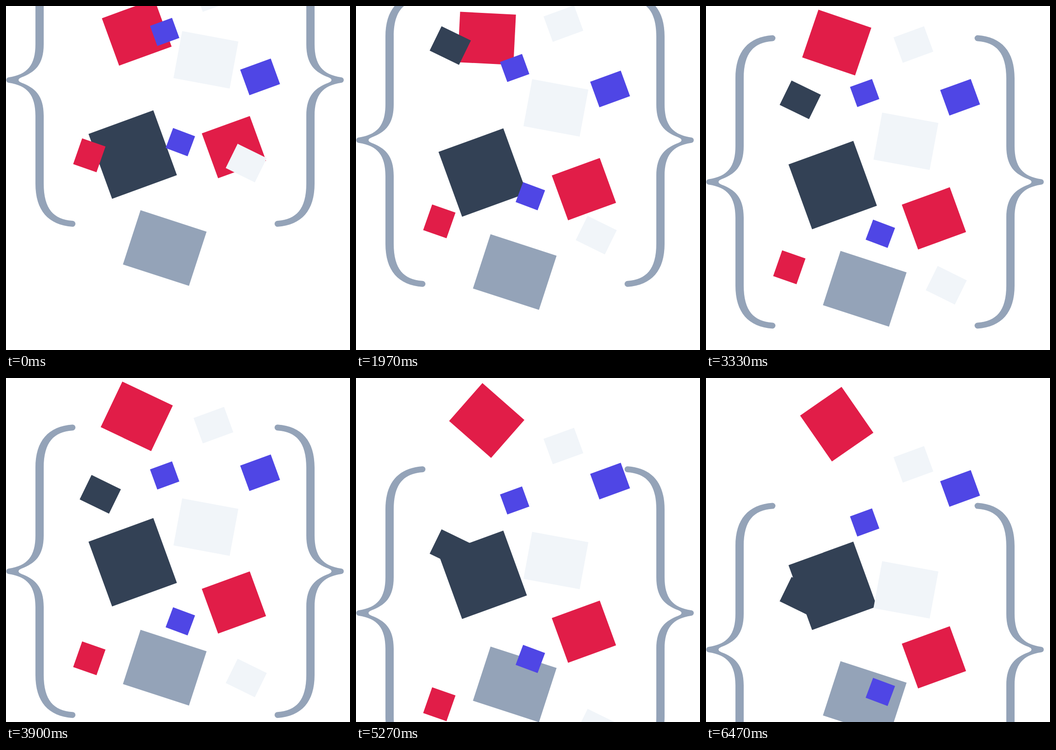
An HTML page for the animation above (6.51 s loop, 748 px wide and 748 px high).

```html
<!DOCTYPE html>
<html lang="en">
<head>
<meta charset="utf-8">
<title>Parallax braces</title>
<style>
html, body { margin: 0; width: 100%; height: 100%; overflow: hidden; background: #fff; }
svg { display: block; width: 100%; height: 100%; }
</style>
</head>
<body>
<svg viewBox="0 0 748 748">
  <g id="tiles"></g>
  <g id="braces" fill="#94a3b8">
    <path id="brace" d="M144.5-319 C92-315 64-284 64-225 V-78 C64-32 46-12 6.5-6 A6 6 0 0 0 6.5 6
      C46 12 64 32 64 78 V225 C64 284 92 315 144.5 319 A6.5 6.5 0 0 0 144.5 306
      C104 303 82 281 82 225 V78 C82 32 62 17 34 6 C25 2.5 25-2.5 34-6
      C62-17 82-32 82-78 V-225 C82-281 104-303 144.5-306 A6.5 6.5 0 0 0 144.5-319Z"/>
    <use href="#brace" transform="translate(735) scale(-1 1)"/>
  </g>
</svg>
<script>
const LOOP = 6510, LAST_STEP = 194, SCROLL_PER_STEP = 2.214, SPIN = 0.1753;
const red = '#e11d48', blue = '#4f46e5', grey = '#94a3b8', dark = '#334155', light = '#f1f5f9';

// Back to front: colour, centre x, starting centre y, width, height, angle, scroll speed
const tiles = [
  [red, 284.3, 57.4, 121.5, 109.7, -20, 0.1],
  [blue, 552.5, 154.2, 70.8, 59, -20, 0.2],
  [dark, 275.5, 323, 150, 150, -20, 0.3],
  [grey, 345.2, 526.3, 151, 124, 18, 0.4],
  [light, 451, -27, 70.6, 58.8, -20, 0.5],
  [blue, 345, 56.4, 51, 46.5, -20, 0.6],
  [red, 495.6, 306.8, 111, 103.6, -20, 0.7],
  [light, 434.7, 117, 124.3, 104, 10.5, 0.8],
  [blue, 379.1, 296, 51, 46.4, 20.5, 0.9],
  [red, 181.2, 324.6, 53.8, 59.2, 19.3, 1.1],
  [light, 522.4, 341.5, 70.6, 58.8, 26.2, 1.2],
  [dark, 205, -83.8, 71, 59, 26, 1.3]
].map(([fill, x, y, w, h, angle, speed], i) => {
  const el = document.createElementNS('http://www.w3.org/2000/svg', 'rect');
  const attrs = { fill, x: -w / 2, y: -h / 2, width: w, height: h };
  for (const name in attrs) el.setAttribute(name, attrs[name]);
  document.getElementById('tiles').append(el);
  return { el, x, y, angle, speed, spin: i ? 0 : SPIN };
});
const braces = document.getElementById('braces');
const start = performance.now();

function draw() {
  const t = (performance.now() - start) % LOOP;
  // 30 steps per second, each starting on a multiple of 10 ms
  const step = Math.min(LAST_STEP, Math.floor((Math.floor(t / 10) + 0.4) * 0.3));
  const scroll = step * SCROLL_PER_STEP;
  for (const { el, x, y, angle, speed, spin } of tiles)
    el.setAttribute('transform', `translate(${x} ${y + scroll * speed}) rotate(${angle + scroll * spin})`);
  braces.setAttribute('transform', `translate(0 ${161.1 + scroll})`);
  requestAnimationFrame(draw);
}
draw();
</script>
</body>
</html>
```
